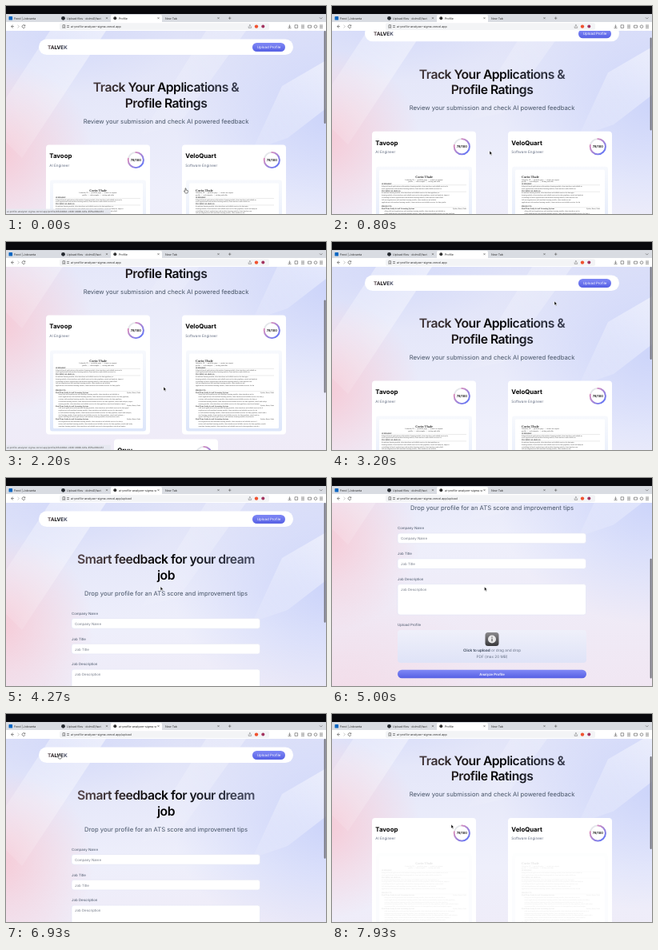
Recreate the animation shown at these times as an HTML page. Size 400 by 260 pixels, loop 8 s.

```html
<!DOCTYPE html>
<html lang="en">
<head>
<title>Application tracker</title>
<style>
  html, body { margin: 0; width: 100%; height: 100%; overflow: hidden; background: #fff; }
  svg { display: block; width: 400px; height: 260px; }
  svg svg { width: 48px; height: 10px; }
  text { font-family: Inter, "Open Sans", sans-serif; text-rendering: geometricPrecision; white-space: pre; }
  .paper text { font-family: "Liberation Serif", "Noto Serif", serif; }
</style>
</head>
<body>
<svg viewBox="0 0 400 260">
  <defs>
    <linearGradient id="ink" gradientUnits="userSpaceOnUse" x1="-20" x2="420" y1="0" y2="0">
      <stop stop-color="#ab8c95"/><stop offset=".5"/><stop offset="1" stop-color="#8e97c5"/>
    </linearGradient>
    <linearGradient id="logoInk" gradientUnits="userSpaceOnUse" x1="44" x2="84" y1="0" y2="0">
      <stop stop-color="#ab8c95"/><stop offset=".5"/><stop offset="1" stop-color="#8e97c5"/>
    </linearGradient>
    <linearGradient id="violet" x2="0" y2="1"><stop stop-color="#8089f6"/><stop offset="1" stop-color="#5660e4"/></linearGradient>
    <linearGradient id="ring" x1="1" y1="0" x2="0" y2="1"><stop stop-color="#ff97ad"/><stop offset="1" stop-color="#5171ff"/></linearGradient>
    <linearGradient id="mat" x2="0" y2="1"><stop stop-color="#f7f9fd"/><stop offset="1" stop-color="#dde6fa"/></linearGradient>
    <linearGradient id="drop" x2="0" y2="1"><stop stop-color="#eff0fa"/><stop offset="1" stop-color="#dfe3f7"/></linearGradient>
    <linearGradient id="steel" x2="0" y2="1"><stop stop-color="#8b8b8e"/><stop offset="1" stop-color="#38383b"/></linearGradient>
    <linearGradient id="sky" x2="0" y2="1">
      <stop stop-color="#dfe2f8"/><stop offset=".45" stop-color="#eeeffb"/><stop offset="1" stop-color="#f1e6f2"/>
    </linearGradient>
    <radialGradient id="rose"><stop stop-color="#f6cbd7"/><stop offset="1" stop-color="#f6cbd7" stop-opacity="0"/></radialGradient>
    <radialGradient id="blue"><stop stop-color="#cdd5fa"/><stop offset="1" stop-color="#cdd5fa" stop-opacity="0"/></radialGradient>
    <linearGradient id="beam" x1="1" y1="0" x2="0" y2="1">
      <stop stop-color="#fff" stop-opacity=".5"/><stop offset="1" stop-color="#fff" stop-opacity=".08"/>
    </linearGradient>
  </defs>
  <g id="home"></g>
  <g id="upload"></g>
  <rect id="thumb" x="397.6" width="2" rx="1" fill="#74747c"/>
  <g id="status"></g>
  <g id="browser"></g>
  <g id="cursor" stroke="#fff" stroke-width=".5" stroke-linejoin="round">
    <path id="arrow" d="M0 0V5L1.2 3.9 2 5.7 2.8 5.3 2 3.6H3.5Z"/>
    <path id="hand" d="M0 0Q.6-.6 1 0V2L3.4 2.7V4.3L2.7 6H.2L-1.6 3.2-.9 2.8 0 3.6Z" fill="#fff" stroke="#111"/>
    <path id="caret" d="M-1-1H1M0-1V4M-1 4H1" fill="none" stroke="#222" stroke-width=".7"/>
  </g>
</svg>
<script>
const LOOP = 8000, TOP = 31, VIEW = 229;
const SITE = 'ai-profile-analyzer-sigma.vercel.app';
const $ = id => document.getElementById(id);

// y is the middle of the capitals
const text = (x, y, size, str, attrs = '') =>
  `<text x="${x}" y="${y + size * .36}" font-size="${size}" ${attrs}>${str}</text>`;
const rect = (x, y, w, h, r, fill, attrs = '') =>
  `<rect x="${x}" y="${y}" width="${w}" height="${h}" rx="${r}" fill="${fill}" ${attrs}/>`;
const line = (d, color = '#555', width = .6) =>
  `<path d="${d}" fill="none" stroke="${color}" stroke-width="${width}"/>`;
const MID = 'text-anchor="middle"';

const backdrop = height => `
  ${rect(0, TOP, 400, height, 0, 'url(#sky)')}
  <ellipse cx="400" cy="140" rx="190" ry="150" fill="url(#blue)"/>
  <ellipse cx="70" cy="40" rx="150" ry="70" fill="url(#blue)" opacity=".6"/>
  <ellipse cx="-10" cy="185" rx="120" ry="115" fill="url(#rose)"/>
  <ellipse cx="20" cy="${TOP + height}" rx="170" ry="150" fill="url(#rose)" opacity=".35"/>
  <path d="M55 31H125L20 190 0 170V115Z" fill="url(#beam)"/>
  <path d="M400 68V128L352 165 308 180 345 100Z" fill="url(#beam)"/>
  <path d="M250 31H300L215 150 170 160Z" fill="url(#beam)" opacity=".6"/>`;

const navbar = rect(41, 41.5, 318, 19.5, 9.75, '#fff')
  + text(52, 51.2, 6.4, 'TALVEK', 'font-weight="700" fill="url(#logoInk)"')
  + rect(308, 46, 41, 11, 5.5, 'url(#violet)')
  + text(328.5, 51.4, 4.45, 'Upload Profile', MID + ' fill="#fff"');

const heading = (first, second, sub) =>
  [first, second].map((s, i) => text(200, 101.7 + i * 19.6, 15.7, s,
    MID + ' font-weight="600" letter-spacing="-.5" fill="url(#ink)"')).join('')
  + text(200, 144, 7.68, sub, MID + ' fill="#475467"');

const FILLER = 'Engineer building full stack applications with machine learning models, clean interfaces and reliable services for data pipelines, search and analysis, improving speed and accuracy across teams. ';

// H section, t project title, s skill, b body, - blank
function paper(x, y, left, right, centred) {
  const titles = ['SUMMARY', 'TECHNICAL SKILLS', 'PROJECTS'];
  const nameX = centred ? x + 65 : x + left, anchor = centred ? MID : '';
  const chars = (right - left) * 1.1;
  let out = rect(x + 5, y + 44, 120, 101, 3, 'url(#mat)') + rect(x + 9, y + 48, 112, 93.5, 1.5, '#fff')
    + text(nameX, y + 56.5, 4.2, 'Corin Thale', anchor + ' font-weight="700"')
    + text(nameX, y + 60, 2.2, 'Lakeside, IN   |   portfolio page   |   contact on request', anchor)
    + text(nameX, y + 62.6, 2.2, 'profile   |   code samples   |   writing and talks', anchor);
  [...'HbbHsssss-HtbbbbbtbbbbbtbbS'].forEach((kind, i) => {
    const rowY = y + 65.6 + i * 2.8;
    if (kind === '-') return;
    if (kind === 'H') {
      out += text(x + left, rowY, 2.4, titles.shift(), 'font-weight="700"')
        + line(`M${x + left} ${rowY + 1.4}H${x + right}`, '#999', .2);
    } else if (kind === 't') {
      out += text(x + left, rowY, 2.3, 'Real Time Analysis and Screening System', 'font-weight="700"')
        + text(x + right, rowY, 2.1, 'Python, React, Node', 'text-anchor="end" font-style="italic"');
    } else {
      const start = i * 11 % 60, short = i * 37 % 5 * 5 + (kind === 's' ? 12 : 4);
      const str = (FILLER + FILLER).slice(start, start + chars - short);
      out += text(x + left + (i > 11 ? 3 : 0), rowY, 2.1, (i > 11 ? '\u2022 ' : '') + str.trim());
    }
  });
  return `<g class="paper" fill="#333">${out}</g>`;
}

function card(x, y, company, role, score, left, right, centred) {
  return rect(x, y, 130, 149, 4, '#fff')
    + text(x + 4.3, y + 14, 7.8, company, 'font-weight="700"')
    + text(x + 4.3, y + 25.6, 4.6, role, 'fill="#667085"')
    + `<g transform="translate(${x + 112.3} ${y + 19})">
        <circle r="9.6" fill="none" stroke="#e5e7eb" stroke-width="1.9"/>
        <circle r="9.6" fill="none" stroke="url(#ring)" stroke-width="1.9" stroke-linecap="round"
          pathLength="100" stroke-dasharray="${score} 100" transform="rotate(-90)"/></g>`
    + text(x + 112.3, y + 19, 4, score + '/100', MID + ' font-weight="600"')
    + paper(x, y, left, right, centred);
}

const field = (y, label, height) => text(82, y, 4.35, label, 'fill="#475467"')
  + rect(82, y + 6.3, 235.5, height, 3, '#fff', 'stroke="#e4e5f5" stroke-width=".7"')
  + text(86, y + 13, 4.35, label, 'fill="#757b88"');

$('home').innerHTML = backdrop(452) + navbar
  + heading('Track Your Applications &amp;', 'Profile Ratings', 'Review your submission and check AI powered feedback')
  + '<g id="cards">'
  + card(50, 173.5, 'Tavoop', 'AI Engineer', 78, 12, 118, true)
  + card(220, 173.5, 'VeloQuart', 'Software Engineer', 78, 17, 115)
  + card(135, 328.5, 'Orvu', 'Frontend Engineer', 75, 15, 117)
  + '</g>';

$('upload').innerHTML = backdrop(350) + navbar
  + heading('Smart feedback for your dream', 'job', 'Drop your profile for an ATS score and improvement tips')
  + field(169.2, 'Company Name', 12.7) + field(201, 'Job Title', 12.7) + field(232.8, 'Job Description', 38.5)
  + text(82, 290, 4.35, 'Upload Profile', 'fill="#475467"')
  + rect(82, 296.5, 236, 41, 4, 'url(#drop)')
  + rect(191.5, 299.5, 17, 17, 3.5, 'url(#steel)')
  + '<circle cx="200" cy="308" r="5" fill="#e9e9ea"/>'
  + line('M200 310.7V307.2M200 306.2V305', '#555', 1.2)
  + text(200, 322, 4.7, '<tspan font-weight="600" fill="#344054">Click to upload</tspan> or drag and drop', MID + ' fill="#667085"')
  + text(200, 329.6, 4.7, 'PDF (max 20 MB)', MID + ' fill="#667085"')
  + rect(82, 346.3, 236, 10.5, 5.2, 'url(#violet)')
  + text(200, 351.6, 4.3, 'Analyze Profile', MID + ' font-weight="600" fill="#fff"');

const cross = x => line(`M${x - 1} 14.2L${x + 1} 16.2M${x + 1} 14.2L${x - 1} 16.2`);
$('browser').innerHTML = rect(0, 0, 400, 10, 0, '#08080c') + rect(0, 10, 400, 10.5, 0, '#d9dce2')
  + rect(131, 11, 64, 12, 2, '#fff') + rect(0, 20, 400, 11, 0, '#fff') + rect(67, 21.3, 262, 8.6, 2, '#f3f4f6')
  + rect(3.5, 13, 4.6, 4.6, .7, '#0a66c2') + text(10, 15.3, 3.6, 'Feed | Jobvanta', 'fill="#333"')
  + '<circle cx="71.5" cy="15.3" r="2.4" fill="#24292f"/>' + text(76, 15.3, 3.6, 'Upload files \u00b7 dolm41/tavi', 'fill="#333"')
  + '<circle cx="136.3" cy="15.3" r="2" fill="#333"/>'
  + `<svg x="140" y="10" width="48" height="10">${text(1, 5.3, 3.6, '', 'id="tabTitle" fill="#222"')}</svg>`
  + text(199, 15.3, 3.6, 'New Tab', 'fill="#333"')
  + [126, 190.5, 265.5].map(cross).join('')
  + line('M278 15.2H281.4M279.7 13.5V16.9M392 14.4L393.7 16.1 395.4 14.4')
  + line('M8.6 23.8L6.6 25.6 8.6 27.4M6.6 25.6H10', '#444')
  + line('M14.5 23.8L16.5 25.6 14.5 27.4', '#aaa')
  + line('M23.6 24.6A1.9 1.9 0 1 0 23.8 26.2M23.8 23.4V24.9H22.4M71 23.7H73.6V27.6L72.3 26.6 71 27.6ZM76 24.6H79M76 26.6H79', '#444')
  + text(81, 25.6, 3.65, '', 'id="address" fill="#333"')
  + line('M303.2 25.4V27.4H306.6V25.4M304.9 26.3V23.5M303.8 24.5L304.9 23.5 306 24.5', '#666', .5)
  + '<circle cx="313" cy="25.6" r="2.2" fill="#f0522f"/><circle cx="321.3" cy="25.6" r="2" fill="#a3345f"/>'
  + line('M354.5 23.4V26.5M353.2 25.3L354.5 26.5 355.8 25.3M352.5 27.5H356.5M361 23.8H364.6V27.4H361ZM369 24H373M369 25.7H373M369 27.4H373M377.5 24.2H381.5V27.2H377.5ZM392 24H396M392 25.7H396M392 27.4H396', '#555')
  + '<circle cx="387" cy="25.7" r="1.8" fill="none" stroke="#555" stroke-width=".6"/>';

$('status').innerHTML = rect(0, 253.6, 131, 6.4, 0, '#e6e8f0', 'opacity=".9"')
  + text(1, 257, 2.95, SITE + '/profile/dfb4d6bd-c636-4668-b2fa-35ffa494d4f2', 'fill="#555"');

// Rows of [time, ...values], eased between neighbours
function track(rows, t) {
  const i = rows.findIndex(row => row[0] > t);
  if (i < 0) return rows.at(-1).slice(1);
  const a = rows[i - 1], b = rows[i];
  const p = (t - a[0]) / (b[0] - a[0]), e = p * p * (3 - 2 * p);
  return a.slice(1).map((v, k) => v + (b[k + 1] - v) * e);
}

const OPEN_UPLOAD = 3750, OPEN_HOME = 7250, CARDS_IN = 7500, PAPER_IN = 7800;
const scrolls = [[0, 0], [650, 0], [1400, 161], [1900, 161], [2200, 82], [2600, 0], [4300, 0],
  [4900, 106.5], [5250, 106.5], [5700, 0], [7500, 0], [7850, 43.5]];
const moves = [[0, 224, 228], [500, 197, 181], [2650, 197, 181], [3200, 278, 74], [3550, 326, 50],
  [3850, 326, 50], [4300, 191, 137], [5700, 190, 135], [6200, 190, 135], [6900, 66, 50],
  [7300, 66, 50], [7800, 149, 138]];

const within = (t, ...spans) => spans.some(([a, b]) => t >= a && t < b);
const show = (id, on) => $(id).setAttribute('display', on ? 'inline' : 'none');

function draw(t) {
  const uploading = within(t, [OPEN_UPLOAD, OPEN_HOME]);
  const reloaded = t >= OPEN_HOME;
  const [scroll] = track(scrolls, t), [x, y] = track(moves, t);
  const height = uploading ? 350 : 452;

  show('home', !uploading);
  show('upload', uploading);
  $(uploading ? 'upload' : 'home').setAttribute('transform', `translate(0 ${-scroll})`);
  show('cards', !reloaded || t >= CARDS_IN);
  const opacity = reloaded ? Math.max(0, (t - PAPER_IN) / 1000) : 1;
  document.querySelectorAll('.paper').forEach(g => g.setAttribute('opacity', opacity));

  $('thumb').setAttribute('y', TOP + scroll * VIEW / height);
  $('thumb').setAttribute('height', VIEW * VIEW / height);
  $('address').textContent = SITE + (uploading ? '/upload' : '');
  $('tabTitle').textContent = uploading ? SITE + '/upload' : 'Profile';
  show('status', within(t, [0, 400], [1800, 2600]));

  const hand = within(t, [0, 300], [3450, 3800], [6800, 7350]);
  const caret = within(t, [5700, 6250]);
  show('hand', hand);
  show('caret', caret);
  show('arrow', !hand && !caret);
  $('cursor').setAttribute('transform', `translate(${x} ${y})`);
}

// The picture advances 15 times a second
function tick(now) {
  const t = now % LOOP;
  draw(Math.floor((t + 5) * .015) / .015 % LOOP);
  requestAnimationFrame(tick);
}
draw(0);
requestAnimationFrame(tick);
</script>
</body>
</html>
```
